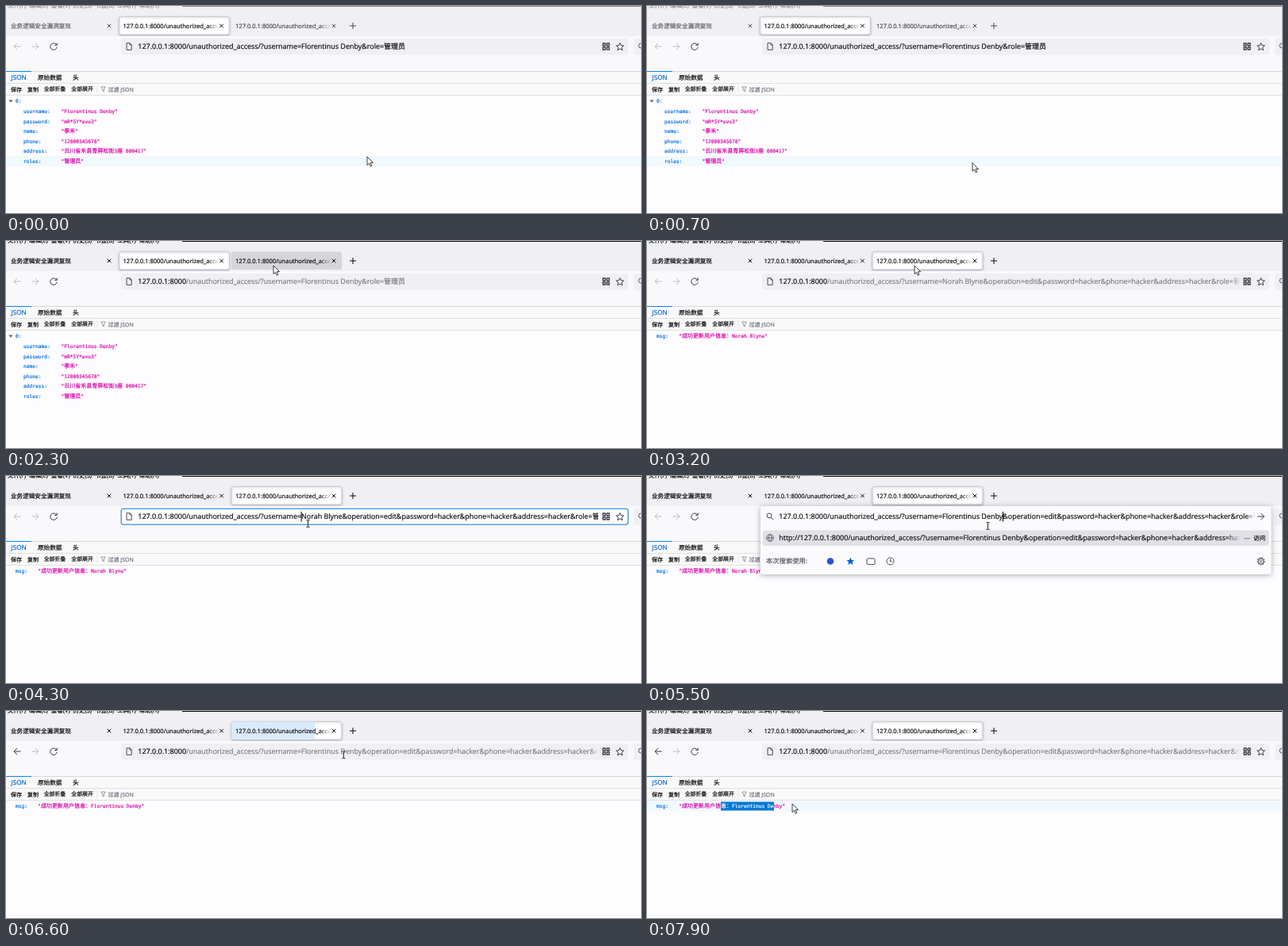
An HTML page with a canvas that plays this animation: 800 px wide and 261 px high, repeating every 8 s.

```html
<!DOCTYPE html>
<html lang="zh">
<head>
<meta charset="utf-8">
<style>
  html, body { margin: 0; width: 100%; height: 100%; overflow: hidden; background: #fff; }
  canvas { display: block; }
</style>
</head>
<body>
<canvas width="800" height="261"></canvas>
<script>
const ctx = document.querySelector('canvas').getContext('2d');
const LOOP = 8000;
const UI = '"Open Sans", "Noto Sans CJK SC", "Noto Sans CJK", sans-serif';
const MONO = '"DejaVu Sans Mono", monospace';
const INK = '#0c0c10', BLUE = '#0060df', KEY = '#0074e8', VALUE = '#dd00a9', SELECT = '#0078d7';
const URL_SIZE = 8.96, URL_X = 166.3;

const ADMIN = 'Florentinus Denby', VICTIM = 'Norah Blyne';
const HOST = '127.0.0.1:8000', PATH = '/unauthorized_access/?username=';
const editQuery = '&operation=edit&password=hacker&phone=hacker&address=hacker&role=管理员';
const record = [
  ['username', ADMIN], ['password', 'mR*5Y*evo3'], ['name', '季禾'], ['phone', '12000345678'],
  ['address', '云川省禾县青屏松街3座 000417'], ['roles', '管理员'],
];

// time, x, y of the pointer
const pointerPath = [
  [0, 455, 190], [100, 455, 190], [350, 440, 171], [900, 393, 213], [1100, 393, 218],
  [1300, 393, 218], [1500, 379, 171], [2100, 340, 38], [2300, 337, 31], [3200, 337, 31],
  [3800, 370, 56], [4000, 372, 58], [4300, 380, 60], [4500, 380, 60], [5100, 429, 63],
  [6300, 429, 63], [6600, 425, 55], [7100, 335, 138], [7400, 160, 120], [7450, 160, 120],
  [7650, 93, 120], [7900, 183, 117], [8000, 183, 117],
];

const between = (t, from, to) => t >= from && t < to;
const progress = (t, from, to) => Math.min(1, Math.max(0, (t - from) / (to - from)));

function pointerAt(t) {
  const i = pointerPath.findIndex(p => p[0] > t);
  const [t0, x0, y0] = pointerPath[i - 1], [t1, x1, y1] = pointerPath[i];
  const k = progress(t, t0, t1);
  return [x0 + (x1 - x0) * k, y0 + (y1 - y0) * k];
}

function rect(x, y, w, h, color) {
  ctx.fillStyle = color;
  ctx.fillRect(x, y, w, h);
}

function roundRect(x, y, w, h, r, fill, stroke, lineWidth = 1) {
  ctx.beginPath();
  ctx.roundRect(x, y, w, h, r);
  if (fill) { ctx.fillStyle = fill; ctx.fill(); }
  if (stroke) { ctx.strokeStyle = stroke; ctx.lineWidth = lineWidth; ctx.stroke(); }
}

function shadowed(blur, color, draw) {
  ctx.save();
  ctx.shadowBlur = blur;
  ctx.shadowColor = color;
  ctx.shadowOffsetY = 1;
  draw();
  ctx.restore();
}

function icon(path, x, y, color = '#3a3944', { fill = false, width = 1 } = {}) {
  ctx.save();
  ctx.translate(x, y);
  ctx.lineWidth = width;
  ctx.strokeStyle = ctx.fillStyle = color;
  ctx.lineJoin = 'round';
  ctx[fill ? 'fill' : 'stroke'](new Path2D(path));
  ctx.restore();
}

// A hairline outline gives small glyphs the weight of hinted screen text.
function glyphs(str, x, y, paint) {
  ctx.fillStyle = ctx.strokeStyle = paint;
  ctx.lineWidth = 0.2;
  ctx.lineJoin = 'round';
  ctx.fillText(str, x, y);
  ctx.strokeText(str, x, y);
}

// Text centred vertically on y; with a right edge it fades out towards it.
function text(str, x, y, size, color = INK, right = 0, fade = 12) {
  let paint = color;
  if (right) {
    paint = ctx.createLinearGradient(right - fade, 0, right, 0);
    paint.addColorStop(0, color);
    paint.addColorStop(1, color + '00');
  }
  ctx.font = `${size}px ${UI}`;
  glyphs(str, x, y + size * 0.36, paint);
}

function widthOf(str, size) {
  ctx.font = `${size}px ${UI}`;
  return ctx.measureText(str).width;
}

// Monospace text whose Chinese runs are set slightly larger.
function code(str, x, y, color) {
  for (const run of str.match(/[\u3000-\uffff]+|[^\u3000-\uffff]+/g)) {
    const wide = run.charCodeAt(0) >= 0x3000;
    ctx.font = wide ? `7px "Noto Sans CJK SC", ${MONO}` : `6.23px ${MONO}`;
    glyphs(run, x, y + 2.3, color);
    x += ctx.measureText(run).width;
  }
}

function clipped(x, y, w, h, background, drawText) {
  if (w <= 0) return;
  ctx.save();
  rect(x, y, w, h, background);
  ctx.beginPath();
  ctx.rect(x, y, w, h);
  ctx.clip();
  drawText();
  ctx.restore();
}

const CLOSE = 'M-2.3-2.3L2.3 2.3M2.3-2.3L-2.3 2.3';
const PLUS = 'M-4 0H4M0-4V4';
const ARROW_LEFT = 'M4.5 0H-4M0-4L-4 0L0 4';
const ARROW_RIGHT = 'M-4.5 0H4M0-4L4 0L0 4';
const RELOAD = 'M3.6-2A4.2 4.2 0 1 0 4.2 .6M4.2-4.5V-1.6H1.3';
const PAGE = 'M-3-4.3H1L3.2-2V4.3H-3ZM1-4.3V-2H3.2';
const STAR = 'M0-4.8L1.4-1.6L4.8-1.3L2.2 1L3 4.4L0 2.6L-3 4.4L-2.2 1L-4.8-1.3L-1.4-1.6Z';
const LENS = 'M2-1A3 3 0 1 1-4-1A3 3 0 1 1 2-1M1.2 1.2L4.2 4.2';
const GLOBE = 'M4.3 0A4.3 4.3 0 1 1-4.3 0A4.3 4.3 0 1 1 4.3 0M-4.3 0H4.3M0-4.3C-2.6-2-2.6 2 0 4.3C2.6 2 2.6-2 0-4.3';
const CLOCK = 'M4.5 0A4.5 4.5 0 1 1-4.5 0A4.5 4.5 0 1 1 4.5 0M0-2.8V.3H2.3';
const GRID = 'M-4-4h3v3h-3zM1-4h3v3h-3zM-4 1h3v3h-3zM1 1h3v3h-3z';
const FUNNEL = 'M-2.8-3H2.8L.8 0V3L-.8 2V0Z';
const POINTER = 'M0 0V10.6L2.5 8.3L4.2 12.2L5.9 11.4L4.2 7.7H7.6Z';
const IBEAM = 'M-2-4.5H-.5L0-4L.5-4.5H2M-2 4.5H-.5L0 4L.5 4.5H2M0-4V4';

function drawTabs(t, active, current) {
  rect(0, 0, 800, 38, '#f0f0f4');
  const ink = active ? INK : '#4a4a52';
  text('文件(F)  编辑(E)  查看(V)  历史(S)  书签(B)  工具(T)  帮助(H)', 2, -1.2, 7.5, active ? '#000000' : '#8c8c94');
  rect(222, 0, 578, 1, active ? '#111' : '#8a8a8e');

  text('业务逻辑安全漏洞复现', 6, 25, 7.6, active ? INK : '#66666e');
  icon(CLOSE, 130, 25, ink);
  [142.5, 284].forEach((x, i) => {
    const selected = current === i + 1;
    if (selected) shadowed(3, '#80808e90', () => roundRect(x, 13.5, 139, 22.5, 2.5, '#fff', '#c6c6ce', 0.8));
    else if (i === 1 && between(t, 2200, 3000)) roundRect(x, 13.5, 139, 22.5, 2.5, '#d5d5da');

    if (i === 1 && between(t, 6500, 6900)) {
      ctx.globalAlpha = 1 - progress(t, 6700, 6900);
      roundRect(x, 13.5, Math.min(139, (t - 6500) * 1.04), 22.5, 2.5, '#d9ebfb');
      ctx.globalAlpha = 1;
    }
    const loading = i === 0 ? between(t, 1400, 1900) : between(t, 6300, 6500);
    if (loading) {
      ctx.beginPath();
      ctx.arc(x + 7.5, 25, 1.2, 0, 7);
      ctx.fillStyle = '#55555f';
      ctx.fill();
    }
    text(HOST + '/unauthorized_acce', x + (loading ? 18.5 : 5), 25, 7.55, selected ? INK : ink, x + 125, 14);
    icon(CLOSE, x + 129, 25, selected ? INK : ink);
  });
  icon(PLUS, 437, 25, ink);
}

function drawAddress(t, active, current) {
  icon(ARROW_LEFT, 14, 51, t >= 6500 ? '#3a3944' : '#bcbcc3');
  icon(ARROW_RIGHT, 37, 51, '#bcbcc3');
  icon(RELOAD, 60, 51);

  roundRect(791, 41, 30, 21, 3, '#f0f0f4');
  icon(LENS, 801, 51, '#5b5b66');

  const focused = between(t, 4300, 6300), open = between(t, 5500, 6300);
  const name = current === 2 && t < 5500 ? VICTIM : ADMIN;
  const query = current === 2 ? editQuery : '&role=管理员';
  const url = HOST + PATH + name + query;
  const nameX = URL_X + widthOf(HOST + PATH, URL_SIZE);
  const nameEnd = nameX + widthOf(name, URL_SIZE);

  if (open) return drawSuggestions(url, nameEnd);

  if (focused) roundRect(145.2, 41.2, 638.6, 20, 3, '#fff', '#5a9fe6', 1.6);
  else roundRect(145, 41, 639, 20.5, 3, '#f0f0f4');
  icon(PAGE, 155, 51, '#4a4a55');
  icon(GRID, 756, 51, '#3a3944', { width: 1.3 });
  icon(STAR, 773.5, 51.3);

  if (focused) {
    const drawUrl = color => () => text(url, URL_X, 51, URL_SIZE, color);
    clipped(URL_X - 1, 44, 747 - URL_X, 14, '#fff', drawUrl(INK));
    const chosen = (nameEnd - nameX) * progress(t, 4500, 5100);
    clipped(nameX, 45, chosen, 12.5, SELECT, drawUrl('#ffffff'));
    if (!chosen) rect(nameX - 0.5, 45, 1, 12.5, '#000');
  } else if (active) {
    text(url, URL_X, 51, URL_SIZE, '#7c7c84', 747);
    clipped(URL_X - 1, 43, widthOf(HOST, URL_SIZE) + 1, 17, '#f0f0f4',
      () => text(url, URL_X, 51, URL_SIZE));
  } else {
    text(url, URL_X, 51, URL_SIZE, INK, 747);
  }
}

function drawSuggestions(url, caretX) {
  shadowed(7, '#00000050', () => roundRect(143, 38, 643.5, 86, 3, '#fbfbfd'));
  icon(LENS, 155, 51, '#4a4a55');
  text(url, URL_X, 51, URL_SIZE, INK, 766);
  rect(caretX - 0.2, 45, 1, 12.5, '#000');
  icon(ARROW_RIGHT, 773.5, 51);

  roundRect(146, 68.5, 637.5, 19.5, 2.5, '#e0e0e6');
  icon(GLOBE, 155, 78, '#4a4a55', { width: 0.8 });
  text('http://' + url, URL_X, 78, URL_SIZE, INK, 747, 18);
  text('—', 752, 78, 7.6, '#5b5b66');
  text('访问', 764, 78, 7.6);

  text('本次搜索使用:', 150, 107.5, 8.3, '#5b5b66');
  ctx.beginPath();
  ctx.arc(231, 107.5, 4.3, 0, 7);
  ctx.fillStyle = '#2a55d8';
  ctx.fill();
  icon(STAR, 256.3, 107.5, BLUE, { fill: true });
  roundRect(277, 104, 10, 7.5, 1.5, null, '#4a4a55');
  icon(CLOCK, 306.5, 107.5, '#4a4a55');
  ctx.setLineDash([1.6, 1.3]);
  icon('M4.3 0A4.3 4.3 0 1 1-4.3 0A4.3 4.3 0 1 1 4.3 0', 773.5, 107.5, '#4a4a55', { width: 1.3 });
  ctx.setLineDash([]);
  icon('M3.4 0A3.4 3.4 0 1 1-3.4 0A3.4 3.4 0 1 1 3.4 0M1.3 0A1.3 1.3 0 1 1-1.3 0A1.3 1.3 0 1 1 1.3 0',
    773.5, 107.5, '#4a4a55', { width: 0.9 });
}

function drawViewerBars() {
  rect(0, 38, 800, 44, '#f9f9fb');
  rect(0, 82, 800, 30, '#f9f9fa');
  rect(0, 82, 800, 1, '#d8d8dc');
  rect(0, 97, 800, 1, '#e0e0e2');
  rect(0, 112, 800, 1, '#e0e0e2');
  rect(0, 82, 32, 1, '#0a84ff');
  text('JSON', 6.5, 90, 8.2, BLUE);
  text('原始数据', 40, 90, 7.6);
  text('头', 84, 90, 7.6);
  text('保存', 6, 105, 7);
  text('复制', 27, 105, 7);
  text('全部折叠', 47.7, 105, 6.9);
  text('全部展开', 82.3, 105, 6.9);
  rect(114.5, 100, 0.7, 10, '#e0e0e2');
  icon(FUNNEL, 122.5, 105, '#737380', { width: 0.7 });
  text('过滤 JSON', 128.5, 105, 7, '#737380');
}

const rowY = i => 120 + 12.6 * i;

function highlightedRow(t, current) {
  if (current === 2) return t >= 7300 ? 0 : -1;
  if (t < 200 || between(t, 1400, 1900)) return 6;
  const y = pointerAt(t)[1];
  return t < 1100 && y < 202 ? Math.floor((y - 113.7) / 12.6) : -1;
}

function drawContent(t, current) {
  rect(0, 113, 800, 148, '#fdfcfe');
  const hover = highlightedRow(t, current);
  if (hover >= 0) rect(0, rowY(hover) - 6.3, 800, 12.6, '#f0f9fe');

  if (current === 1) {
    icon('M-2.8-1.4H2.8L0 1.8Z', 6, 120, '#6a6a72', { fill: true });
    code('0:', 12, rowY(0), KEY);
    record.forEach(([key, value], i) => {
      code(key + ':', 22, rowY(i + 1), KEY);
      code(`"${value}"`, 69.5, rowY(i + 1), VALUE);
    });
    return;
  }
  const message = `"成功更新用户信息：${t < 6500 ? VICTIM : ADMIN}"`;
  code('msg:', 12, 120, KEY);
  code(message, 40.2, 120, VALUE);
  const from = 160 - 67 * progress(t, 7450, 7650);
  clipped(from, 114.5, 160 - from, 11, SELECT, () => code(message, 40.2, 120, '#fff'));
}

function drawPointer(t) {
  const [x, y] = pointerAt(t);
  const overUrl = x > 165 && x < 745 && y > 42 && y < 64;
  const overMessage = t > 7300 && x < 175 && y > 114 && y < 126;
  if (overUrl || overMessage) {
    icon(IBEAM, x + 0.5, y, '#222');
  } else {
    icon(POINTER, x, y, '#fff', { fill: true });
    icon(POINTER, x, y, '#111', { width: 0.8 });
  }
}

function draw(t) {
  const active = t >= 1300, current = t < 3000 ? 1 : 2;
  ctx.textRendering = 'geometricPrecision';
  drawTabs(t, active, current);
  drawContent(t, current);
  drawViewerBars();
  drawAddress(t, active, current);
  drawPointer(t);
}

function frame() {
  draw(performance.now() % LOOP);
  requestAnimationFrame(frame);
}
frame();
</script>
</body>
</html>
```
